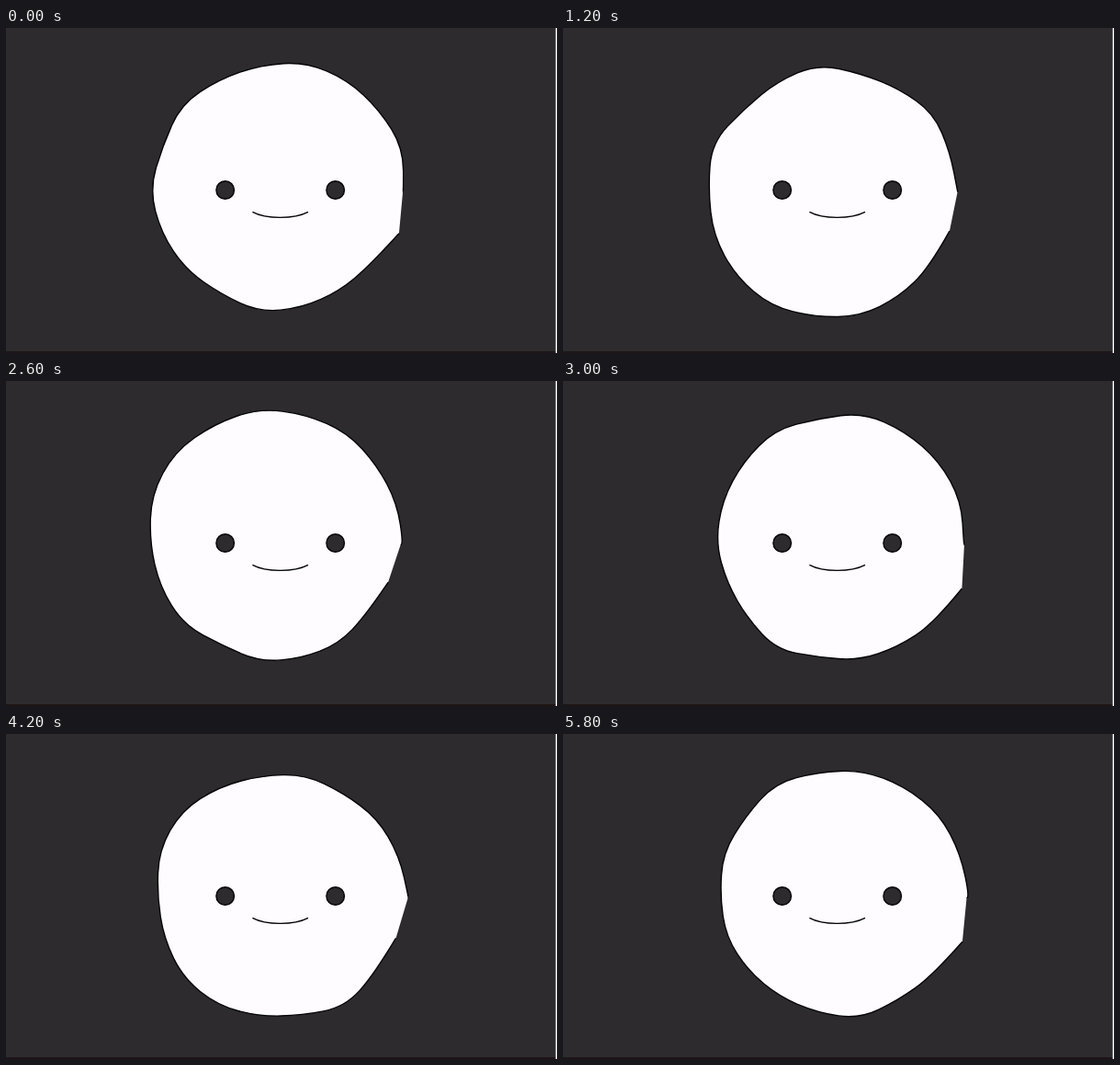
These frames come from a looping animation (600x354 px, 6 s). An HTML page:

```html
<!DOCTYPE html>
<html lang="en">
<head>
<meta charset="utf-8">
<title>Wobbling face</title>
<style>
  html, body { margin: 0; width: 100%; height: 100%; overflow: hidden; background: #2d2b2e; }
  svg { display: block; width: 600px; height: 354px; }
</style>
</head>
<body>
<svg viewBox="0 0 600 354">
  <rect width="600" height="354" fill="#2d2b2e"/>
  <rect y="352" width="600" height="2" fill="#1f1517"/>
  <rect x="598.6" width="1.4" height="354" fill="#fff"/>
  <g stroke="#050505" stroke-width="1.4">
    <path id="blob" fill="#fefcff"/>
    <g fill="#2d2b2e">
      <circle cx="238.7" cy="176.5" r="9.8"/>
      <circle cx="358.7" cy="176.5" r="9.8"/>
    </g>
    <path d="M268.4 200.4C283 208.3 314 208.3 329 200.4" fill="none"/>
  </g>
</svg>
<script>
const STEP = 200, STEPS = 30;
const CX = 300, CY = 177, RADIUS = 136.5;
const POINTS = 18, ANGLE = 0.35;   // a little over one full turn
const ROUGH = 5, SWAY = 9;

// Drift of the body: step, x, y
const drift = [
  [0, -2.6, -6.4], [6, -7.3, 2.1], [10, -2.2, -6.7], [15, 3.9, -5.8],
  [18, -0.2, -7.4], [24, 5.8, -1.4], [29, 4.6, -4.8], [30, -2.6, -6.4]
];

// Seeded random number from -1 to 1
function rand(seed) {
  const v = Math.sin(seed * 12.9898) * 43758.5453;
  return 2 * (v - Math.floor(v)) - 1;
}

// Body offset: between two keys it strays from the straight way
function offset(step) {
  const i = drift.findIndex(key => key[0] > step);
  const a = drift[i - 1], b = drift[i];
  const u = (step - a[0]) / (b[0] - a[0]);
  const stray = SWAY * Math.sin(Math.PI * u);
  return [1, 2].map(n => a[n] + (b[n] - a[n]) * u + stray * rand(step * 2 + n));
}

const mid = (a, b) => [(a[0] + b[0]) / 2, (a[1] + b[1]) / 2];
const text = p => p.map(v => v.toFixed(2)).join(" ");

// Open curve through midpoints; its ends miss each other at the right
function outline(step) {
  const [dx, dy] = offset(step);
  const p = Array.from({ length: POINTS + 1 }, (_, k) => {
    const c = Math.cos(k * ANGLE), s = Math.sin(k * ANGLE);
    const r = RADIUS + dx * c + dy * s + ROUGH * rand(step * 31 + k + 100);
    return [CX + r * c, CY + r * s];
  });
  let d = "M" + text(p[1]);
  for (let k = 2; k <= POINTS; k++) {
    d += "Q" + text(p[k]) + " " + text(mid(p[k], p[(k + 1) % p.length]));
  }
  return d;
}

const shapes = Array.from({ length: STEPS }, (_, i) => outline(i));
const blob = document.getElementById("blob");
const start = performance.now();

function draw() {
  const step = Math.floor((performance.now() - start) / STEP) % STEPS;
  blob.setAttribute("d", shapes[step]);
  requestAnimationFrame(draw);
}
draw();
</script>
</body>
</html>
```
